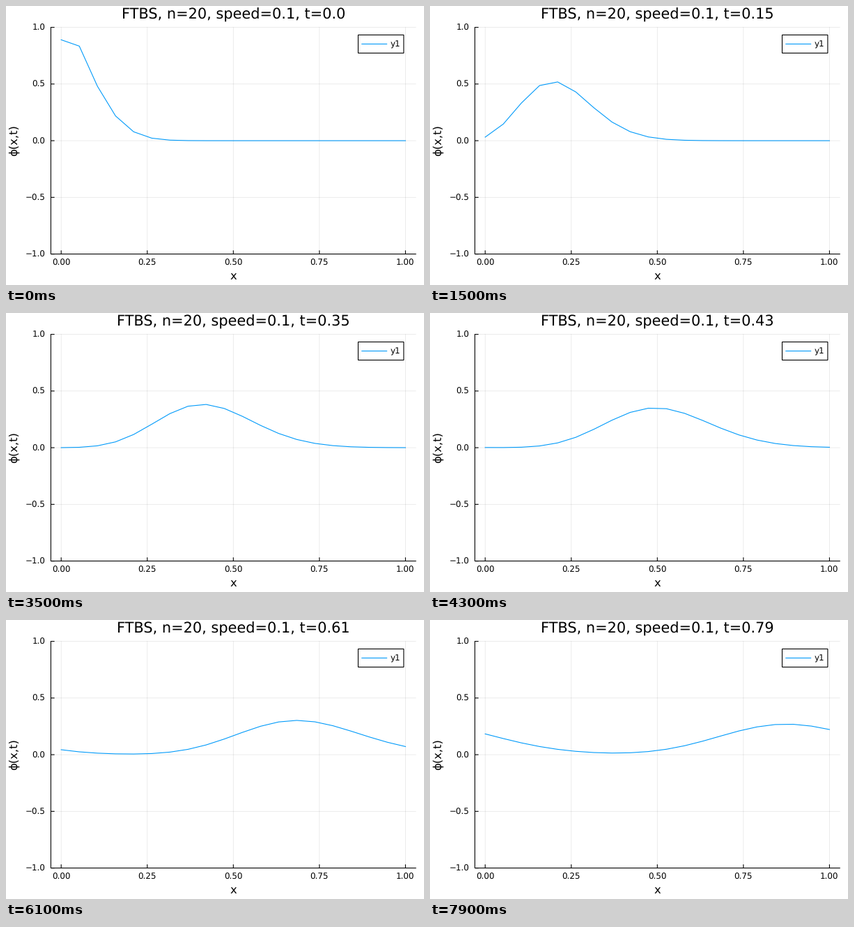
Write a matplotlib script that moves like this. It is 600 by 400 pixels and loops after 8000 ms.

```python
import numpy as np
import matplotlib.pyplot as plt
from matplotlib.animation import FuncAnimation
from matplotlib.patches import Rectangle

W, H, DPI = 600, 400, 100
FRAMES, INTERVAL = 80, 100
N, COURANT = 20, 0.2
BLUE = "#009AFA"
LEFT, RIGHT, TOP, BOTTOM = 64.4, 588.2, 30.6, 355.6
X0, X1 = 79.2, 573.4
TITLE, LABEL, SMALL = 15, 11.8, 8.57  # font sizes in points

plt.rcParams.update({"font.family": "DejaVu Sans", "text.hinting": "none"})


def px(x):
    return X0 + (X1 - X0) * x


def py(y):
    return (TOP + BOTTOM) / 2 - y * (BOTTOM - TOP) / 2


def solve():
    """Forward-time backward-space advection on a periodic grid."""
    phi = 1.261 * np.exp(-((np.arange(N) + 1) ** 2) / 8)
    phi[14:] = 0
    states = []
    for _ in range(FRAMES):
        phi = phi - COURANT * (phi - np.roll(phi, 1))
        states.append(phi)
    return states


fig = plt.figure(figsize=(W / DPI, H / DPI), dpi=DPI, facecolor="white")
ax = fig.add_axes([0, 0, 1, 1])
ax.set(xlim=(0, W), ylim=(H, 0))
ax.axis("off")


def stroke(xs, ys, color="black", width=1.1, **kw):
    return ax.plot(xs, ys, color=color, lw=width * 72 / DPI, snap=False, **kw)[0]


def label(x, y, s, size, ha="center", **kw):
    return ax.text(x, y, s, fontsize=size, ha=ha, va="baseline", **kw)


for v in np.linspace(0, 1, 5):
    x = px(v)
    stroke([x, x], [TOP, BOTTOM], width=0.75, alpha=0.1)
    stroke([x, x], [BOTTOM, BOTTOM - 5.2], solid_capstyle="butt")
    label(x, 371.6, f"{v:.2f}", SMALL)

for v in np.linspace(-1, 1, 5):
    y = py(v)
    stroke([LEFT, RIGHT], [y, y], width=0.75, alpha=0.1)
    stroke([LEFT, LEFT + 5.2], [y, y], solid_capstyle="butt")
    label(56.6, y + 4.4, f"{v:.1f}".replace("-", "\u2212"), SMALL, ha="right")

stroke([LEFT, LEFT, RIGHT], [TOP, BOTTOM, BOTTOM], solid_joinstyle="miter")
label(326.3, 392, "x", LABEL)
label(16, 193, "\u03d5(x,t)", LABEL, rotation=90, rotation_mode="anchor")
title = label(326.3, 18.4, "", TITLE)

curve = stroke([], [], BLUE)

ax.add_patch(Rectangle((505.5, 41.5), 65.4, 26, fc="white", ec="black",
                       lw=1.1 * 72 / DPI, snap=False, zorder=3))
stroke([510.8, 546.6], [54.5, 54.5], BLUE, zorder=4)
label(551.6, 58.9, "y1", SMALL, ha="left", zorder=4)

grid = px(np.linspace(0, 1, N))
states = solve()


def update(i):
    curve.set_data(grid, py(states[i]))
    title.set_text(f"FTBS, n={N}, speed=0.1, t={i / 100}")
    return curve, title


anim = FuncAnimation(fig, update, frames=FRAMES, interval=INTERVAL,
                     repeat=True, repeat_delay=0)
plt.show()
```
